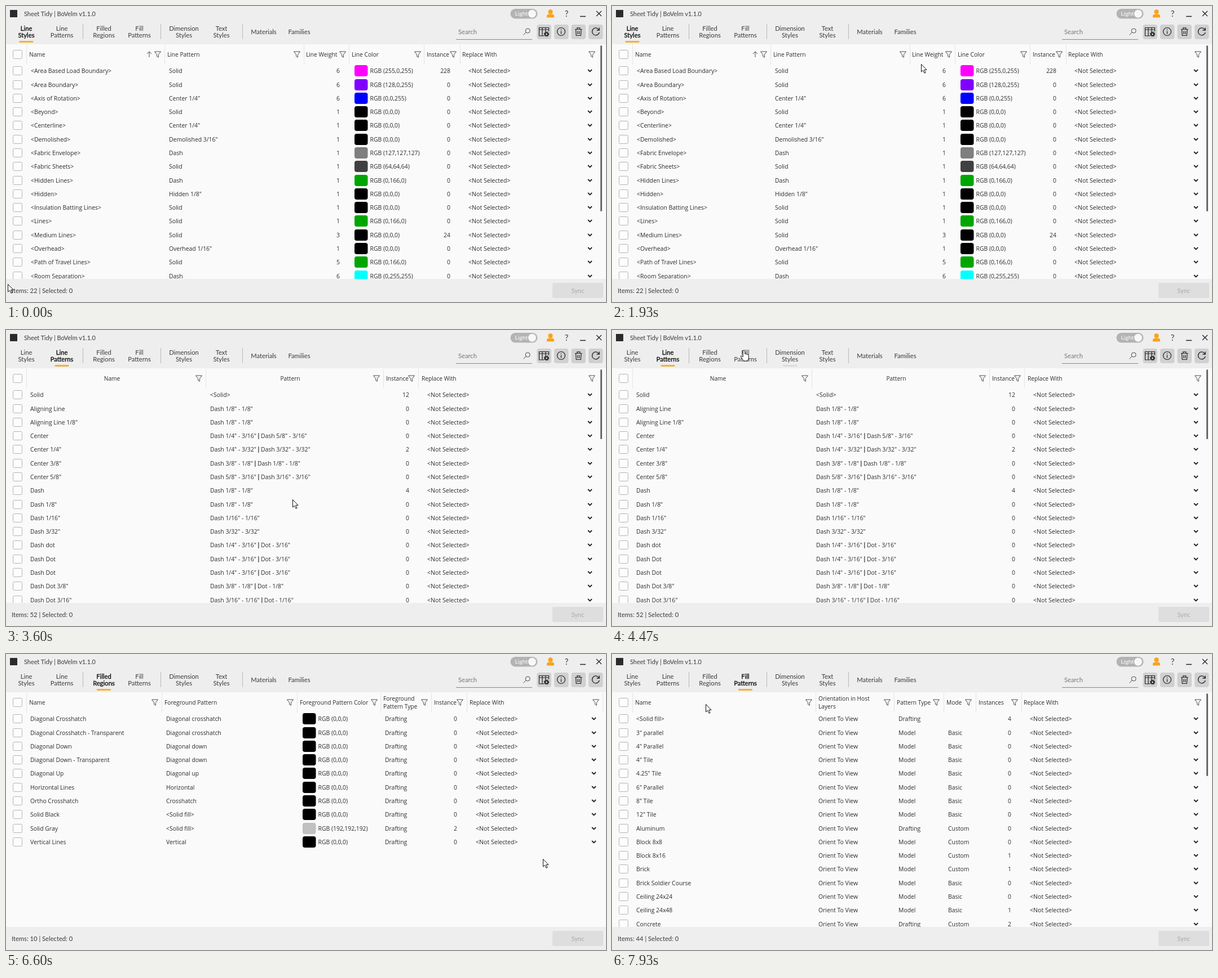
An HTML page that plays this animation: 1064 px wide and 526 px high, repeating every 8000 ms.

```html
<!DOCTYPE html>
<html lang="en">
<head>
<meta charset="utf-8">
<title>Style manager</title>
<style>
  html, body { margin: 0; width: 100%; height: 100%; overflow: hidden; background: #eee; }
  svg { display: block; width: 1064px; height: 526px; }
  text { font: 10.4px "Open Sans", "Noto Sans", sans-serif; fill: #2c2c2c; white-space: pre; }
  .ui { font: 11.2px Lato, sans-serif; fill: #3a3a3a; }
  .mid { text-anchor: middle; }
  .end { text-anchor: end; }
  .pick { font-size: 10.6px; }
  .head { font-size: 10.2px; }
  .bar { font: bold 10.4px Lato, sans-serif; fill: #111; }
  .tab.on text { fill: #111; stroke: #111; stroke-width: .35px; }
  .tab rect { fill: none; }
  .tab.hover rect { fill: #dcdcdc; }
  .tab.on rect { fill: #f2b233; }
  .line { fill: none; stroke: #4a4a4a; stroke-width: 1; }
  .box { fill: #fdfdfd; stroke: #b4b4b4; }
  .rule { stroke: #e4e4e4; }
  .chevron { fill: none; stroke: #222; stroke-width: 1.8; }
</style>
</head>
<body>
<svg id="stage" viewBox="0 0 1064 526"></svg>
<script>
const FRAMES = 120, FRAME_MS = 8000 / FRAMES;
const stage = document.getElementById("stage");

function el(tag, attrs, parent = stage, content) {
  const node = document.createElementNS("http://www.w3.org/2000/svg", tag);
  for (const key in attrs) node.setAttribute(key, attrs[key]);
  if (content !== undefined) node.textContent = content;
  parent.appendChild(node);
  return node;
}
const label = (x, y, content, cls = "", parent = stage) => el("text", { x, y, class: cls }, parent, content);
const rect = (x, y, width, height, fill, rx = 0, parent = stage) => el("rect", { x, y, width, height, fill, rx }, parent);
const path = (d, attrs = {}, parent = stage) => el("path", { d, class: "line", ...attrs }, parent);
const at = (x, y) => `translate(${x} ${y})`;

// Column x: positive is left aligned, negative right aligned, "#x" a colour swatch.
const tables = [
  { items: 22, thumb: 295, pick: 820, chevron: 1035, sort: 254,
    rules: [36, 281, 528, 608, 741, 805],
    heads: [["Name", 41, 269], ["Line Pattern", 286, 516], ["Line Weight", 532, 597], ["Line Color", 613, 730], ["Instance", 746, 793], ["Replace With", 809, 1039]],
    cols: [44, 289, -592, "#618", -788],
    rows: `<Area Based Load Boundary>;Solid;6;255,0,255;228
<Area Boundary>;Solid;6;128,0,255;0
<Axis of Rotation>;Center 1/4";6;0,0,255;0
<Beyond>;Solid;1;0,0,0;0
<Centerline>;Center 1/4";1;0,0,0;0
<Demolished>;Demolished 3/16";1;0,0,0;0
<Fabric Envelope>;Dash;1;127,127,127;0
<Fabric Sheets>;Solid;1;64,64,64;0
<Hidden Lines>;Dash;1;0,166,0;0
<Hidden>;Hidden 1/8";1;0,0,0;0
<Insulation Batting Lines>;Solid;1;0,0,0;0
<Lines>;Solid;1;0,166,0;0
<Medium Lines>;Solid;3;0,0,0;24
<Overhead>;Overhead 1/16";1;0,0,0;0
<Path of Travel Lines>;Solid;5;0,166,0;0
<Room Separation>;Dash;6;0,255,255;0` },
  { items: 52, thumb: 124, pick: 747, chevron: 1035,
    rules: [36, 354, 669, 731],
    heads: [["Name", 188, 342, "mid"], ["Pattern", 504, 657, "mid"], ["Instance", 674, 719], ["Replace With", 737, 1039]],
    cols: [43, 362, -715],
    rows: `Solid;<Solid>;12
Aligning Line;Dash 1/8" - 1/8";0
Aligning Line 1/8";Dash 1/8" - 1/8";0
Center;Dash 1/4" - 3/16" | Dash 5/8" - 3/16";0
Center 1/4";Dash 1/4" - 3/32" | Dash 3/32" - 3/32";2
Center 3/8";Dash 3/8" - 1/8" | Dash 1/8" - 1/8";0
Center 5/8";Dash 5/8" - 3/16" | Dash 3/16" - 3/16";0
Dash;Dash 1/8" - 1/8";4
Dash 1/8";Dash 1/8" - 1/8";0
Dash 1/16";Dash 1/16" - 1/16";0
Dash 3/32";Dash 3/32" - 3/32";0
Dash dot;Dash 1/4" - 3/16" | Dot - 3/16";0
Dash Dot;Dash 1/4" - 3/16" | Dot - 3/16";0
Dash Dot;Dash 1/4" - 3/16" | Dot - 3/16";0
Dash Dot 3/8";Dash 3/8" - 1/8" | Dot - 1/8";0
Dash Dot 3/16";Dash 3/16" - 1/16" | Dot - 1/16";0` },
  { items: 10, thumb: 0, pick: 833, chevron: 1042,
    rules: [36, 276, 516, 664, 754, 817, 1058],
    heads: [["Name", 41, 264], ["Foreground Pattern", 281, 504], ["Foreground Pattern Color", 521, 653], ["Foreground|Pattern Type", 669, 742], ["Instance", 759, 805], ["Replace With", 822, 1046]],
    cols: [43, 284, "#526", 672, -800],
    rows: `Diagonal Crosshatch;Diagonal crosshatch;0,0,0;Drafting;0
Diagonal Crosshatch - Transparent;Diagonal crosshatch;0,0,0;Drafting;0
Diagonal Down;Diagonal down;0,0,0;Drafting;0
Diagonal Down - Transparent;Diagonal down;0,0,0;Drafting;0
Diagonal Up;Diagonal up;0,0,0;Drafting;0
Horizontal Lines;Horizontal;0,0,0;Drafting;0
Ortho Crosshatch;Crosshatch;0,0,0;Drafting;0
Solid Black;<Solid fill>;0,0,0;Drafting;0
Solid Gray;<Solid fill>;192,192,192;Drafting;2
Vertical Lines;Vertical;0,0,0;Drafting;0` },
  { items: 44, thumb: 147, pick: 741, chevron: 1035,
    rules: [36, 361, 500, 588, 645, 726],
    heads: [["Name", 41, 349], ["Orientation in Host|Layers", 366, 488], ["Pattern Type", 505, 575], ["Mode", 593, 632], ["Instances", 650, 714], ["Replace With", 730, 1039]],
    cols: [43, 366, 508, 596, -708],
    rows: `<Solid fill>;Orient To View;Drafting;;4
3" parallel;Orient To View;Model;Basic;0
4" Parallel;Orient To View;Model;Basic;0
4" Tile;Orient To View;Model;Basic;0
4.25" Tile;Orient To View;Model;Basic;0
6" Parallel;Orient To View;Model;Basic;0
8" Tile;Orient To View;Model;Basic;0
12" Tile;Orient To View;Model;Basic;0
Aluminum;Orient To View;Drafting;Custom;0
Block 8x8;Orient To View;Model;Custom;0
Block 8x16;Orient To View;Model;Custom;1
Brick;Orient To View;Model;Custom;1
Brick Soldier Course;Orient To View;Model;Basic;0
Ceiling 24x24;Orient To View;Model;Basic;0
Ceiling 24x48;Orient To View;Model;Basic;1
Concrete;Orient To View;Drafting;Custom;2` }
];

function checkbox(y, parent) {
  el("rect", { x: 12.5, y: y - 7.5, width: 16, height: 15, rx: 2, class: "box" }, parent);
}

function cell(col, value, y, parent) {
  if (typeof col === "string") {
    const x = +col.slice(1);
    rect(x, y - 10, 23.5, 20, `rgb(${value})`, 4, parent);
    label(x + 27.5, y + 4, `RGB (${value})`, "", parent);
    return;
  }
  const text = label(Math.abs(col), y + 4, "", col < 0 ? "end" : "", parent);
  for (const part of value.split(/(\|)/)) el("tspan", { class: part === "|" ? "bar" : "" }, text, part);
}

function buildTable(table) {
  const group = el("g", {});
  checkbox(86, group);
  for (const x of table.rules) el("line", { x1: x + .5, x2: x + .5, y1: 69, y2: 104, class: "rule" }, group);
  for (const [name, x, filterX, cls = ""] of table.heads) {
    const lines = name.split("|");
    lines.forEach((line, i) => label(x, lines.length > 1 ? 83 + 14 * i : 90, line, "head " + cls, group));
    path("M-5.5-5H5.5L1.4.3V5.2L-1.4 3.6V.3Z", { transform: at(filterX, 86) }, group);
  }
  if (table.sort) path("M0 5V-5M-4-1L0-5L4-1", { transform: at(table.sort, 86) }, group);
  table.rows.split("\n").forEach((row, i) => {
    const y = Math.round(115.25 + 24.29 * i);
    checkbox(y, group);
    row.split(";").forEach((value, c) => cell(table.cols[c], value, y, group));
    label(table.pick, y + 4, "<Not Selected>", "pick", group);
    path("M-3.5-2L0 1.5L3.5-2", { class: "chevron", transform: at(table.chevron + .5, y) }, group);
  });
  if (table.thumb) rect(1054, 70, 3, table.thumb, "#686868", 1.5, group);
  label(10, 510, `Items: ${table.items} | Selected: 0`, "ui", group);
  return group;
}

rect(0, 0, 1064, 526, "#eee");
rect(0, 68, 1064, 417, "#fafafa");
// The footer covers the cut-off last row but lies under its own labels.
const groups = tables.map(buildTable);
for (const group of groups) group.insertBefore(rect(0, 485, 1064, 41, "#eee"), group.lastChild);
rect(969, 492, 90, 27, "#dedede", 2);
label(1014, 510, "Sync", "ui mid").style.fill = "#aaa";

// Title bar
rect(7, 7, 13, 13, "#2b2b2b");
label(32, 17.5, "Sheet Tidy | BoVelm v1.1.0", "ui").style.fontSize = "10.9px";
rect(894.5, 5, 48, 17.5, "#b3b3b3", 8.7);
const toggle = label(902.5, 17, "Light", "ui");
toggle.style.fill = "#fff";
toggle.style.fontSize = "10.4px";
el("circle", { cx: 933, cy: 13.7, r: 7, fill: "#f8f8f8" });
path("M959 20.5V18Q959 14.5 963 14.5H968Q972 14.5 972 18V20.5Z", { style: "fill:#faa21b;stroke:none" });
el("circle", { cx: 965.5, cy: 10.3, r: 4, fill: "#faa21b" });
label(994, 19, "?", "ui mid").style.fontSize = "15px";
path("M1018 18.5H1028M1047 9L1056 18M1056 9L1047 18", { style: "stroke:#222;stroke-width:1.3" });

// Tabs
const tabs = [["Line|Styles", 36], ["Line|Patterns", 99], ["Filled|Regions", 173.5], ["Fill|Patterns", 236.5],
  ["Dimension|Styles", 315.5], ["Text|Styles", 382], ["Materials", 457], ["Families", 520]].map(([name, x]) => {
  const tab = el("g", { class: "tab" });
  const lines = name.split("|");
  lines.forEach((line, i) => label(x, lines.length > 1 ? 43.5 + 12.3 * i : 49.5, line, "ui mid", tab));
  el("rect", { x: x - 12.5, y: 62, width: 25, height: 3, rx: 1 }, tab);
  return tab;
});
for (const x of [136.5, 274.5, 419.5]) path(`M${x} 32V59`, { style: "stroke:#b8b8b8" });

// Search and tool buttons
label(802, 49.5, "Search", "ui").style.fill = "#777";
path("M798 59.5H933", { style: "stroke:#888" });
path("M922 47L917.5 51.5M921.2 44a4 4 0 1 0 8 0a4 4 0 1 0-8 0");
for (const x of [941.5, 972, 1002.5, 1033]) rect(x, 33, 25.5, 26, "#d0d0d0", 4);
path("M954 53H945.5V38.5H962.5V45M945.5 42H962.5M951 38.5V53M957 38.5V46", { style: "stroke:#222;stroke-width:1.2" });
el("circle", { cx: 958.5, cy: 50, r: 2.6, fill: "none", stroke: "#222", "stroke-width": 2 });
el("circle", { cx: 958.5, cy: 50, r: 4.2, fill: "none", stroke: "#222", "stroke-width": 1.2, "stroke-dasharray": "1.65" });
path("M977.5 45.5a7 7 0 1 0 14 0a7 7 0 1 0-14 0M984.5 44.5V49.5M984.5 41.2V42.8", { style: "stroke:#222;stroke-width:1.2" });
path("M1009 41.5H1021.5M1012.8 41V38.8H1017.7V41M1010.5 42L1011.2 52.5H1019.3L1020 42M1013.8 44.5V50M1016.7 44.5V50", { style: "stroke:#222;stroke-width:1.2" });
path("M1051.7 42.5A6.5 6.5 0 1 0 1052.2 47M1052.2 38.5V43H1047.5", { style: "stroke:#222;stroke-width:1.3" });

// Pointer
const pointer = el("g", { fill: "#fff", stroke: "#111", "stroke-linejoin": "round" });
const arrow = path("M.5.5V14L3.6 11.2L6 16.3L8.1 15.4L5.8 10.4H10Z", { class: "" }, pointer);
const hand = path("M-1.8 1Q0-1.5 1.8 1V6.5Q3.6 5.6 4.4 7.2Q6.2 6.4 6.6 8Q8.4 7.6 8.4 9.5V14Q7 16.5 7 19H-1Q-2 16-5.2 12.2Q-6.4 9.4-3.8 10L-1.8 12Z", { class: "" }, pointer);

// Pointer route: step, x, y
const route = [
  "0 3 494", "1 7 486", "7 60 300", "12 124 118", "13 133 104", "16 262 178", "18 140 60", "19 86 45", "20 98 46",
  "24 98 46", "25 150 50", "29 548 103", "32 722 288", "35 420 120", "37 212 7", "38 205 6", "41 120 30", "44 100 50",
  "46 100 50", "47 185 90", "48 264 131", "52 480 260", "59 546 366", "60 548 368", "64 420 180", "65 325 50",
  "67 234 36", "70 172 42", "72 170 46", "76 170 46", "77 154 69", "80 200 120", "85 350 140", "89 498 94", "90 520 92",
  "93 960 78", "94 1041 76", "96 1041 76", "97 1030 120", "99 952 364", "100 930 372", "104 500 200", "107 148 85",
  "109 209 57", "111 230 43", "114 230 43", "115 215 60", "119 166 89"
].map(p => p.split(" ").map(Number));

const slope = (i, axis) => (route[i + 1][axis] - route[i][axis]) / (route[i + 1][0] - route[i][0]);

// Monotone tangent: the curve never overshoots its points.
function tangent(i, axis) {
  if (i === 0 || i === route.length - 1) return 0;
  const a = slope(i - 1, axis), b = slope(i, axis);
  return a * b <= 0 ? 0 : 2 * a * b / (a + b);
}

function position(step, axis) {
  let i = 0;
  while (i < route.length - 2 && route[i + 1][0] <= step) i++;
  const span = route[i + 1][0] - route[i][0], u = (step - route[i][0]) / span;
  const p = route[i][axis], q = route[i + 1][axis];
  return p + (q - p) * u * u * (3 - 2 * u)
    + span * u * (1 - u) * ((1 - u) * tangent(i, axis) - u * tangent(i + 1, axis));
}

// Hover marks lag behind the pointer: first step, end step, tab
const hovers = [[20, 27, 1], [47, 50, 1], [65, 69, 4], [70, 77, 2]];
const switches = [50, 77, 115];

function draw(now) {
  const step = Math.floor((now % 8000 + 5) / FRAME_MS) % FRAMES;
  const active = switches.filter(s => step >= s).length;
  const hover = hovers.find(([from, to]) => step >= from && step < to);
  groups.forEach((group, i) => group.setAttribute("visibility", i === active ? "visible" : "hidden"));
  tabs.forEach((tab, i) => {
    tab.classList.toggle("on", i === active);
    tab.classList.toggle("hover", !!hover && hover[2] === i);
  });
  const x = Math.round(position(step, 1)), y = Math.round(position(step, 2));
  const overTabs = y > 32 && y < 59 && x > 15 && x < 545;
  pointer.setAttribute("transform", at(x, y));
  arrow.setAttribute("visibility", overTabs ? "hidden" : "visible");
  hand.setAttribute("visibility", overTabs ? "visible" : "hidden");
  requestAnimationFrame(draw);
}
draw(0);
</script>
</body>
</html>
```
